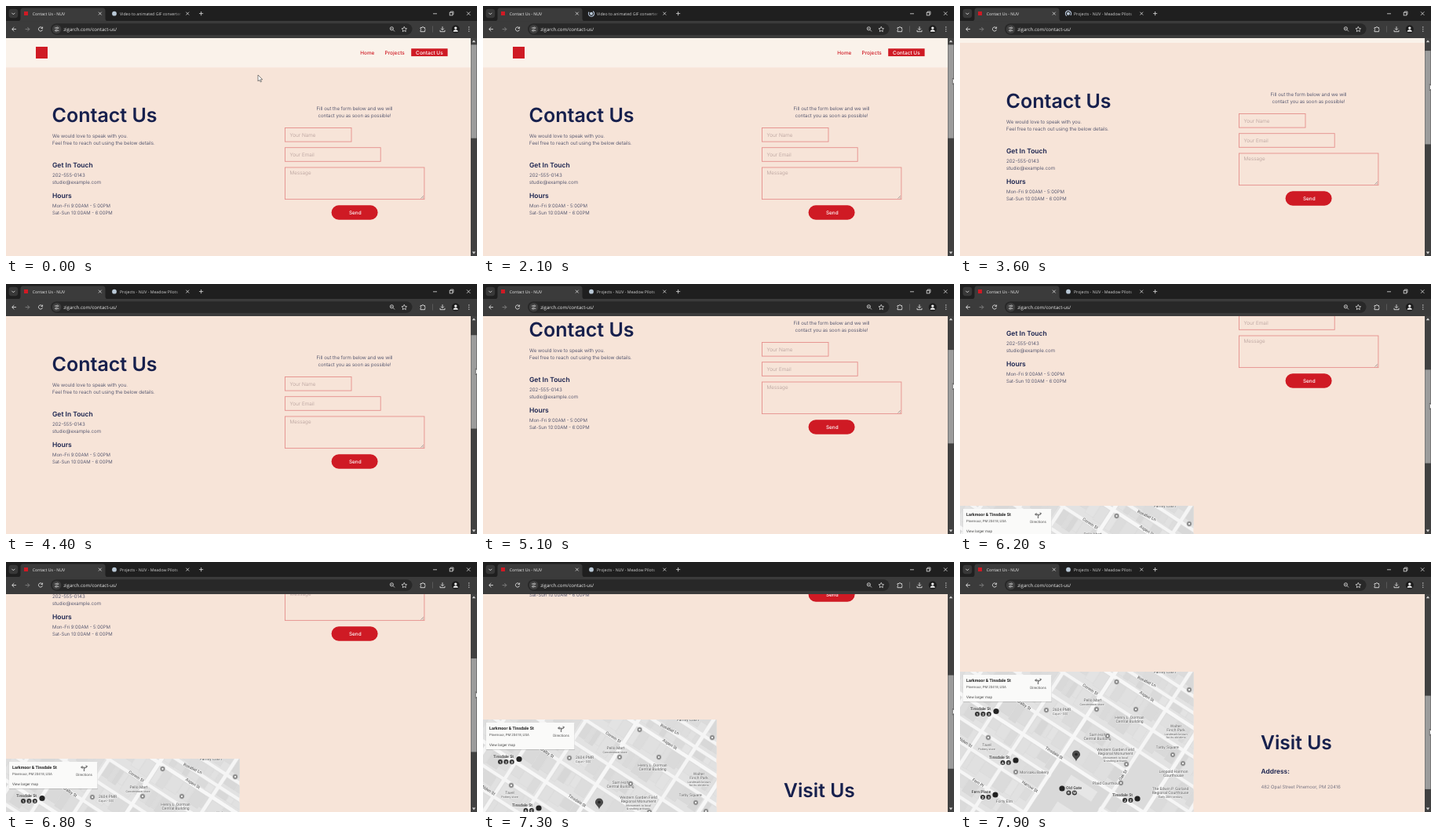
An HTML page that plays this animation: 600x319 px, repeating every 8 s.

```html
<!DOCTYPE html>
<html lang="en">
<head>
<meta charset="utf-8">
<title>Contact page</title>
<style>
html, body { margin: 0; width: 100%; height: 100%; overflow: hidden; background: #f7e4d8; }
svg { display: block; width: 600px; height: 319px; }
text { white-space: pre; text-rendering: geometricPrecision; }
.page text { font-family: Inter, "Open Sans", sans-serif; }
.map text { font-family: Roboto, Arial, sans-serif; }
.chrome text { font-family: "Open Sans", "Noto Sans", sans-serif; }
</style>
</head>
<body>
<svg id="stage" viewBox="0 0 600 319" xmlns="http://www.w3.org/2000/svg"></svg>
<script>
const LOOP = 8000, STEP = 100;
const NAVY = '#17204d', BODY = '#2c3355', RED = '#cf1a24', PEACH = '#f7e4d8', HINT = '#b39c98';

const text = (x, y, str, size, fill, weight = 400, anchor = 'start', extra = '') =>
  `<text x="${x}" y="${y}" font-size="${size}" fill="${fill}" font-weight="${weight}" text-anchor="${anchor}" ${extra}>${str.replace(/&/g, '&amp;')}</text>`;
const rect = (x, y, w, h, fill, extra = '') =>
  `<rect x="${x}" y="${y}" width="${w}" height="${h}" fill="${fill}" ${extra}/>`;
const circle = (x, y, r, fill, extra = '') =>
  `<circle cx="${x}" cy="${y}" r="${r}" fill="${fill}" ${extra}/>`;
const line = (d, stroke, width = 1, extra = '') =>
  `<path d="${d}" fill="none" stroke="${stroke}" stroke-width="${width}" ${extra}/>`;

function random(seed) {
  return () => (seed = (seed * 16807) % 2147483647) / 2147483647;
}

function contactForm() {
  const field = (y, w, h, label, base) =>
    rect(355.5, y, w, h, 'none', 'stroke="#e58f8c" stroke-width=".9"') +
    text(361.5, base, label, 6.4, HINT, 300);
  return text(444, 133, 'Fill out the form below and we will', 6.15, BODY, 300, 'middle') +
    text(444, 142, 'contact you as soon as possible!', 6.15, BODY, 300, 'middle') +
    field(155.5, 84.5, 17.6, 'Your Name', 166.6) +
    field(180.7, 121.7, 17.6, 'Your Email', 191.8) +
    field(206, 177.4, 40.6, 'Message', 215.2) +
    line('M528.5 245.6L532 242.1M530.7 245.6L532 244.3', '#77706f', .6) +
    rect(414.6, 254.2, 59, 18.6, RED, 'rx="9.3"') +
    text(444.8, 265.9, 'Send', 6.4, '#fff', 500, 'middle');
}

function details() {
  const small = (y, s, size = 6.2) => text(59, y, s, size, BODY, 300);
  return text(58.5, 148, 'Contact Us', 25, NAVY, 600) +
    small(168, 'We would love to speak with you.') +
    small(177, 'Feel free to reach out using the below details.') +
    text(59, 205.8, 'Get In Touch', 8.5, NAVY, 600) +
    small(217.8, '202-555-0143') +
    small(226.6, 'studio@example.com') +
    text(59, 245.3, 'Hours', 8.5, NAVY, 600) +
    small(257.2, 'Mon-Fri 9:00AM - 5:00PM', 6) +
    small(266.2, 'Sat-Sun 10:00AM - 6:00PM', 6);
}

function streetGrid() {
  const rows = [-185, -145, -127, -111, -80, -48, -18, 14, 40, 66, 97, 125, 155];
  const cols = [-205, -160, -118, -72, -16, 64, 112, 160, 210];
  const rnd = random(71);
  let out = '';
  for (let i = 0; i < cols.length - 1; i++) {
    for (let j = 0; j < rows.length - 1; j++) {
      const x0 = cols[i] + 2.2, x1 = cols[i + 1] - 2.2, y = rows[j] + 2, h = rows[j + 1] - rows[j] - 4;
      out += rect(x0, y, x1 - x0, h, '#e2e2e2');
      for (let x = x0 + 1; x < x1 - 4;) {
        const w = Math.min(5 + rnd() * 12, x1 - x - 1), g = 215 + Math.floor(rnd() * 14);
        out += rect(x.toFixed(1), y + 1, w.toFixed(1), (h * (.55 + rnd() * .35)).toFixed(1),
          `rgb(${g},${g},${g})`, 'stroke="#cfcfcf" stroke-width=".25"');
        x += w + .8;
      }
    }
  }
  out += rect(-13, 17, 74, 105, '#d9d9d9') + rect(8, 24, 40, 15, '#e6e6e6') + rect(12, 62, 24, 18, '#e6e6e6');
  out += rect(67, -45, 42, 60, '#dbdbdb');
  out += line('M-16 -200V170M112 -200V170', '#f7f7f7', 4.6) + line('M-220 14H230M-220 -111H230', '#f7f7f7', 4.4);
  return `<g transform="translate(148 247) rotate(33)">${out}</g>`;
}

function map() {
  const ink = '#5c5c5c', halo = 'stroke="#f0f0f0" stroke-width=".9" paint-order="stroke"';
  const street = (x, y, s, angle = 33) =>
    text(x, y, s, 5.2, '#454545', 400, 'middle', `transform="rotate(${angle} ${x} ${y})" ${halo}`);
  const place = (x, y, lines, anchor = 'middle') =>
    lines.map((s, i) => text(x, y + i * 5.4, s, 5, ink, 400, anchor, halo)).join('');
  const note = (x, y, s, anchor = 'middle') => text(x, y, s, 3.8, ink, 400, anchor, halo);
  const station = (x, y, s) => text(x, y, s, 5.2, '#333', 500, 'middle', halo);
  const dot = (x, y) => circle(x, y, 3.4, '#858585', 'stroke="#f0f0f0" stroke-width=".6"') + circle(x, y, 1.2, '#eee');
  const stop = (x, y, letters) => [...letters].map((c, i) =>
    circle(x + i * 7.4, y, 3, '#333') + text(x + i * 7.4, y + 1.6, c, 4.4, '#fff', 700, 'middle')).join('');
  const badge = (x, y) => circle(x, y, 3.6, '#222');

  return `<g class="map" clip-path="url(#mapClip)">` + rect(0, 140, 297.5, 260, '#f5f5f5') + streetGrid() +
    street(165, 164, 'Corwin St') + street(237, 173, 'Aspen St') + street(237, 154, 'Rosabel Ln', 26) +
    street(81, 184, 'Dalby St') + street(119, 245, 'Tinsdale St') + street(88, 288, 'Harrow St') +
    street(5, 231, 'Milden St') + street(22, 283, 'Fern Pl') + street(209, 273, 'Oak St', -57) +
    place(261, 142.3, ['Family Court']) +
    place(169, 178, ['Pello Mart']) + note(168, 183, 'Convenience store') +
    place(118, 190, ['2604 PMR'], 'start') + note(118, 195, 'Cajun • $$$', 'start') +
    place(216, 200, ['Henry L. Dorman', 'Central Building']) +
    place(175, 222, ['Sam Holt', 'Central Building']) +
    place(198, 241, ['Western Garden Field', 'Regional Monument']) +
    note(198, 251, 'Monument to local') + note(198, 255, '& visiting artisans') +
    place(275, 211, ['Walter', 'Finch Park']) +
    note(275, 220.5, 'Landmark known') + note(275, 224.8, 'for its old elms') +
    place(264, 238, ['Tarby Square']) +
    place(272, 269, ['Leopold Harmon', 'Courthouse']) +
    place(268, 291, ['The Edwin P. Garland', 'Regional Courthouse']) +
    note(268, 301, 'Early 20th-century') +
    place(188, 284, ['Plaid Courthouse']) +
    place(76, 270, ['Morisaku Bakery'], 'start') +
    place(34, 235, ['Tavel']) + note(34, 240, 'Pottery store') +
    place(46, 307, ['Forty Elm'], 'start') +
    station(26, 189, 'Tinsdale St') + station(50, 251, 'Tinsdale St') + station(27, 295, 'Fern Place') +
    station(145, 290, 'Old Gate') + station(207, 299, 'Tinsdale St') +
    stop(22, 194, '123') + badge(46, 190.5) + stop(54.5, 256, 'AC') + badge(71, 253) +
    stop(29, 300, '23') + badge(45, 297) + badge(130, 289) + stop(138.5, 294.5, 'RW') +
    stop(210, 304, 'JZ') + badge(226, 302) +
    dot(110, 189) + dot(174, 188) + dot(199.5, 153) + dot(292, 163) + dot(224, 188) + dot(188, 222) +
    dot(71, 268) + dot(36, 224) + dot(271, 246) + dot(212, 258) + dot(205, 282) + dot(284, 257) +
    '<path d="M148 254.5C147 250.5 142.9 249 142.9 245.6A5.1 5.1 0 0 1 153.1 245.6C153.1 249 149 250.5 148 254.5Z" fill="#4b4b4b"/>' +
    circle(148, 245.5, 1.8, '#242424') +
    rect(3.7, 144.6, 113.2, 34.4, '#000', 'opacity=".14"') + rect(4, 144, 112.5, 34, '#fafaf9') +
    text(8, 152.6, 'Larkmoor & Tinsdale St', 5.4, '#222', 700) +
    text(8, 160.5, 'Pinemoor, PM 20418, USA', 4.4, '#555') +
    text(8, 173.7, 'View larger map', 4.6, '#444') +
    line('M99.5 156V151.2H96.5M99.5 152.5L102.8 150.3', '#777', 1.3) +
    '<path d="M97.6 148.8V153L94.8 151ZM101.4 148.2L104.2 149.4 102.4 152Z" fill="#777"/>' +
    text(99.6, 162, 'Directions', 4.6, '#555', 400, 'middle') + '</g>';
}

function visit() {
  return text(383, 238.5, 'Visit Us', 24.6, NAVY, 600) +
    text(383.5, 269.6, 'Address:', 8.4, NAVY, 600) +
    text(383.5, 289.2, '482 Opal Street Pinemoor, PM 20416', 5.9, '#54566c', 300);
}

function header() {
  return rect(0, 40, 592, 38.4, '#faf2ea') + rect(38, 52, 15, 15, RED) +
    text(451.3, 61.7, 'Home', 6.4, RED, 500) + text(482.5, 61.7, 'Projects', 6.5, RED, 500) +
    rect(516.2, 54.3, 46.4, 9.8, RED) + text(539.4, 61.7, 'Contact Us', 6.5, '#fff', 500, 'middle');
}

function browser() {
  const light = '#dedede', dim = '#828282';
  const cross = (x, y, r) => line(`M${x - r} ${y - r}L${x + r} ${y + r}M${x + r} ${y - r}L${x - r} ${y + r}`, light, .8);
  return rect(0, 0, 600, 20, '#1f1f1f') + rect(0, 19, 600, 22, '#3b3b3b') +
    rect(3.6, 3.8, 11.6, 11.4, '#383838', 'rx="3.4"') + line('M7.4 8.8L9.4 10.8 11.4 8.8', light, .9) +
    '<path d="M15 19.4Q18.5 19.4 18.5 16V6Q18.5 2.4 22 2.4H123Q126.5 2.4 126.5 6V16Q126.5 19.4 130 19.4Z" fill="#3b3b3b"/>' +
    rect(23, 7, 5, 5, RED) + text(33.8, 11.7, 'Contact Us - NUV', 5.2, '#eee') + cross(119.8, 9.6, 1.9) +
    circle(138, 9.7, 2.6, '#b9c8d6', 'id="icon"') +
    `<g id="spinner">${line('M138 6.1A3.6 3.6 0 1 1 134.4 9.7', '#c4d4ec', 1.1)}</g>` +
    `<g clip-path="url(#titleClip)"><text id="tabTitle" x="145" y="11.7" font-size="5.2" fill="#d3d3d3"></text></g>` +
    rect(215, 4, 10, 12, 'url(#fade)') + cross(231.3, 9.6, 1.9) +
    line('M246 9.6H251.2M248.6 7V12.2', light, .8) +
    line('M544 9.8H549', light, .8) +
    rect(565.2, 8.2, 3.7, 3.7, 'none', `stroke="${light}" stroke-width=".8"`) +
    line('M566.4 8V7H570V10.7H569', light, .7) + cross(589.2, 9.6, 2.2) +
    line('M13 29.6H7.8M10.3 27L7.7 29.6 10.3 32.2', light, .9) +
    line('M24.6 29.6H29.8M27.3 27L29.9 29.6 27.3 32.2', dim, .9) +
    line('M46.2 28A2.6 2.6 0 1 0 46.5 30.3M46.6 26.6V28.6H44.5', light, .9) +
    rect(57, 22.2, 460.5, 14.8, '#282828', 'rx="7.4"') + circle(64.6, 29.6, 5.7, '#3f3f3f') +
    line('M62 28H64.2M66.6 28H67.4M62 31.3H62.8M65.2 31.3H67.4', light, .8) +
    circle(65.4, 28, 1, 'none', `stroke="${light}" stroke-width=".7"`) +
    circle(64, 31.3, 1, 'none', `stroke="${light}" stroke-width=".7"`) +
    text(73.2, 31.8, 'zigarch.com/contact-us/', 6.1, '#ececec') +
    circle(491.4, 28.8, 2.1, 'none', `stroke="${light}" stroke-width=".8"`) + line('M493 30.4L495 32.4M490.4 28.8H492.4', light, .8) +
    line('M507.3 26.3L508.3 28.5 510.6 28.8 508.9 30.4 509.3 32.7 507.3 31.5 505.3 32.7 505.7 30.4 504 28.8 506.3 28.5Z', light, .8) +
    line('M528 27.6H530A1 1 0 0 1 532 27.6H533.6V29.3A1 1 0 0 1 533.6 31.1V32.7H528V31A1 1 0 0 0 528 29.2Z', light, .9) +
    line('M543.5 25.5V33.5', '#666', .7) +
    line('M556 26.2V30.4M554.1 28.7L556 30.6 557.9 28.7M553 30.8V32.7H559V30.8', light, .9) +
    circle(572.8, 29.6, 5, '#1c1c1c') + circle(572.8, 28.1, 1.7, '#f2f2f2') +
    '<path d="M569.7 32.8Q569.9 30.3 572.8 30.3Q575.7 30.3 575.9 32.8Z" fill="#f2f2f2"/>' +
    [27, 29.6, 32.2].map(y => circle(589.8, y, .65, light)).join('');
}

function scrollbar() {
  return rect(592, 41, 8, 278, '#414141') +
    '<path d="M593.8 46.2L596 43.4 598.2 46.2ZM593.8 313.6L596 316.4 598.2 313.6Z" fill="#d8d8d8"/>' +
    rect(592.4, 49.4, 7.2, 119.3, '#9c9c9c', 'id="thumb"');
}

const $ = id => document.getElementById(id);
$('stage').innerHTML = `
  <defs>
    <clipPath id="pageClip"><rect x="0" y="41" width="592" height="278"/></clipPath>
    <clipPath id="mapClip"><rect x="0" y="140" width="297.5" height="260"/></clipPath>
    <clipPath id="titleClip"><rect x="145" y="2" width="79" height="16"/></clipPath>
    <linearGradient id="fade"><stop stop-color="#1f1f1f" stop-opacity="0"/><stop offset="1" stop-color="#1f1f1f"/></linearGradient>
  </defs>
  ${rect(0, 0, 600, 319, PEACH)}
  <g class="page" clip-path="url(#pageClip)">
    <g id="content">${details()}${contactForm()}<g transform="translate(0 283)">${map()}${visit()}</g></g>
    <g id="header">${header()}</g>
  </g>
  <g class="chrome">${browser()}${scrollbar()}</g>
  <path id="cursor" d="M0 0V8L1.9 6.3 3.2 9 4.5 8.4 3.2 5.8H5.7Z" fill="#fff" stroke="#333" stroke-width=".6"/>`;

// Each track lists [time, value] pairs, joined by straight lines.
const scrollTrack = [[3000, 0], [3600, 18], [4400, 37], [4500, 43], [5400, 100], [5600, 107], [6800, 172], [7900, 283]];
const headerTrack = [[3300, 0], [3600, -31.4], [3700, -40]];
const cursorX = [[0, 321], [900, 550], [1200, 598.3]];
const cursorY = [[0, 88], [1200, 92]];

function at(track, t) {
  if (t <= track[0][0]) return track[0][1];
  for (let i = 1; i < track.length; i++) {
    const [t0, a] = track[i - 1], [t1, b] = track[i];
    if (t <= t1) return a + (b - a) * (t - t0) / (t1 - t0);
  }
  return track[track.length - 1][1];
}

const move = (id, x, y) => $(id).setAttribute('transform', `translate(${x.toFixed(2)} ${y.toFixed(2)})`);

function draw() {
  const t = Math.floor(performance.now() % LOOP / STEP) * STEP;
  const scroll = Math.round(at(scrollTrack, t)), drag = scroll / 2.335;
  move('content', 0, -scroll);
  move('header', 0, at(headerTrack, t));
  move('thumb', 0, drag);
  move('cursor', at(cursorX, t), at(cursorY, t) + drag);
  const loading = t >= 300 && t < 4300;
  $('spinner').style.display = loading ? '' : 'none';
  $('spinner').setAttribute('transform', `rotate(${t * .36} 138 9.7)`);
  $('icon').setAttribute('r', loading ? 2 : 2.9);
  $('tabTitle').textContent = t < 2800 ? 'Video to animated GIF converter' : 'Projects - NUV - Meadow Pilots';
  requestAnimationFrame(draw);
}
draw();
</script>
</body>
</html>
```
